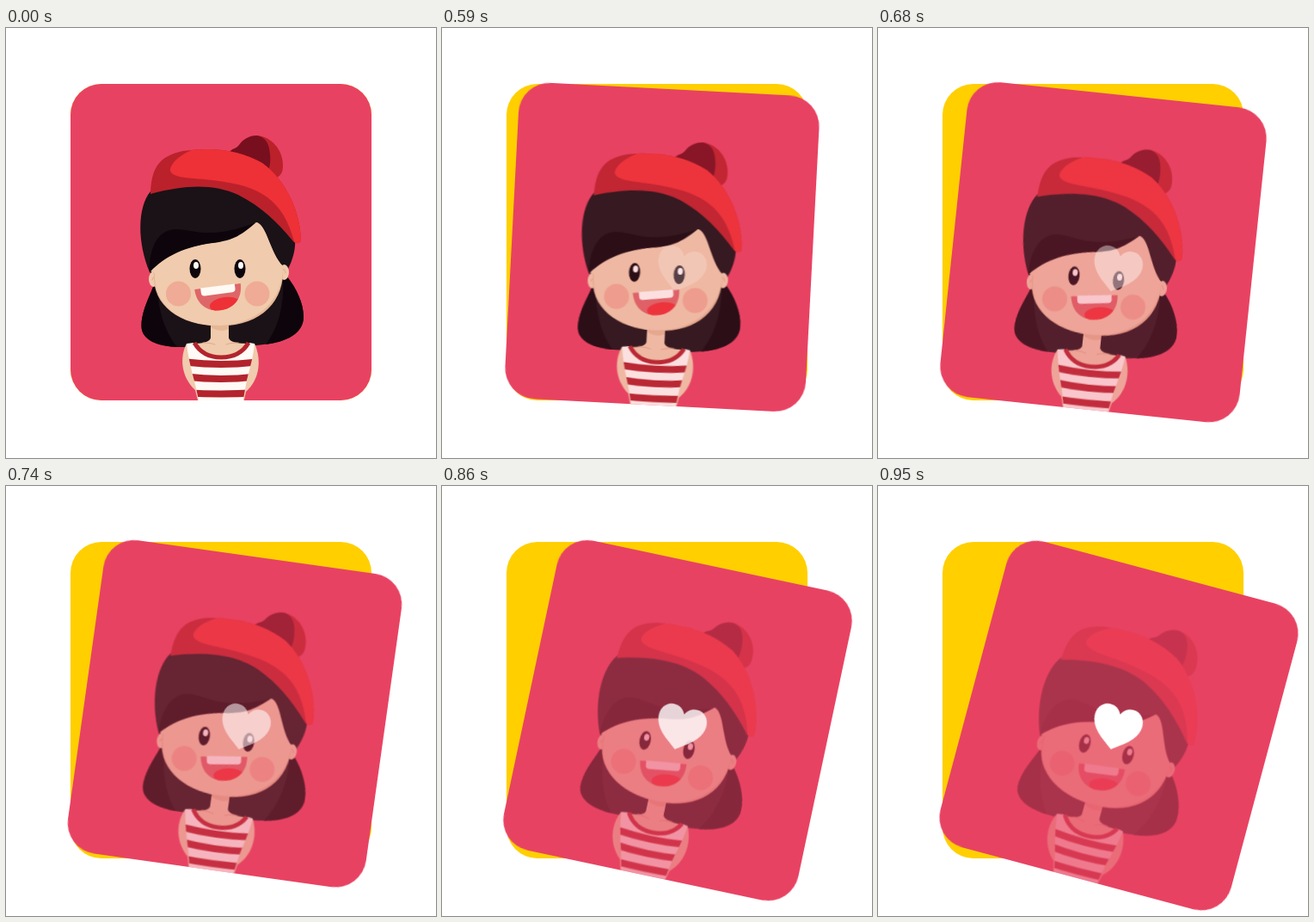
An HTML page for the animation above (1420 ms loop, 500 by 500 pixels).

```html
<!DOCTYPE html>
<html lang="en">
<head>
<meta charset="utf-8">
<title>Tilting card</title>
<style>
  html, body { margin: 0; width: 100%; height: 100%; overflow: hidden; background: #fff; }
  svg { display: block; width: 100vw; height: 100vh; }

  /* 15 hard steps of 30 ms, then a hold */
  .card, .girl, .heart { animation: 1420ms infinite both; }
  .card { transform-box: view-box; transform-origin: 250px 249px; animation-name: tilt; }
  .girl { animation-name: fade; }
  .heart { animation-name: show; }

  @keyframes tilt {
    0% { transform: translate(0px, 0px) rotate(0deg); }
    35.2% { transform: translate(0px, 0px) rotate(0deg); animation-timing-function: steps(15, end); }
    66.89%, 100% { transform: translate(30px, 29.5px) rotate(15deg); }
  }
  @keyframes fade {
    0% { opacity: 1; transform: translate(0px, 0px); }
    35.2% { opacity: 1; transform: translate(0px, 0px); animation-timing-function: steps(15, end); }
    66.89%, 100% { opacity: .3; transform: translate(-2.7px, -.5px); }
  }
  @keyframes show {
    0% { opacity: 0; }
    35.2% { opacity: 0; animation-timing-function: steps(15, end); }
    66.89%, 100% { opacity: 1; }
  }

  .pink { fill: #e84262; }
  .yellow { fill: #ffcf00; }
  .hair { fill: #1a1217; }
  .ink { fill: #0d050b; }
  .skin { fill: #f0cbad; }
  .shade { fill: #e5b795; }
  .line { fill: none; stroke: #dfa98a; stroke-width: 1; stroke-linecap: round; }
  .blush { fill: #efab95; }
  .red { fill: #ee3136; }
  .crimson { fill: #bb212b; }
  .wine { fill: #780f1e; }
  .cloth { fill: #fffaf5; }
  .stripes { fill: none; stroke: #b3242d; stroke-width: 8; }
  .collar { fill: none; stroke: #b3242d; stroke-width: 5; }
</style>
</head>
<body>
<svg viewBox="0 0 500 500">
  <defs>
    <path id="shirt" d="M210 367 L218 366 C225 379 236 384 250 384 C265 384 276 379 283 366 L289 367 C287 388 281 402 279 415 L275 437 H224.500 C221 412 213 395 210 367Z"/>
    <path id="mouth" d="M-27 0 H27 C27 18 15 28 0 28 C-15 28 -27 18 -27 0Z"/>
    <path id="beret" d="M168 193 C169 165 176 149 206 143 C242 138 272 142 298 157 C326 177 343 215 343 248 C340 251 336 251 333 247 C316 226 296 207 270 194 C242 181 208 182 168 193Z"/>
    <clipPath id="inShirt"><use href="#shirt"/></clipPath>
    <clipPath id="inMouth"><use href="#mouth"/></clipPath>
    <clipPath id="inBeret"><use href="#beret"/></clipPath>
    <clipPath id="inCard"><rect x="75" y="65" width="350" height="368" rx="36"/></clipPath>
  </defs>

  <rect class="yellow" x="75" y="65" width="350" height="368" rx="36"/>

  <g class="card">
    <rect class="pink" x="75" y="65" width="350" height="368" rx="36"/>
    <g clip-path="url(#inCard)">
      <g class="girl">
        <!-- back hair -->
        <path class="hair" d="M175 285 C174 303 158 322 157.500 346 C157 364 180 371 205 371 C240 371 265 370 290 369 C322 367 346 357 346 336 C346 320 338 303 326 288Z"/>
        <path class="ink" d="M175 285 C174 303 158 322 157.500 346 C157 364 178 370 199 371 C184 352 175 325 176 290Z"/>
        <path class="ink" d="M326 288 C338 303 346 320 346 336 C346 355 326 365 302 368 C316 350 324 322 322 292Z"/>

        <!-- body -->
        <path class="skin" d="M210 367 C202 382 203 405 220 421 L224 437 H276 L279 423 C296 408 297 384 289 367 C276 367 260 367 259 360 V343 H238 V360 C237 367 222 367 210 367Z"/>
        <path class="shade" d="M238 344 H259 V350 C252 353 244 352 238 348Z"/>
        <path class="line" d="M229 366 Q238 366 243 368 M270 366 Q261 366 256 368"/>
        <use class="cloth" href="#shirt"/>
        <path class="stripes" clip-path="url(#inShirt)" d="M205 388 Q250 394 295 388 M205 405 Q250 411 295 405 M205 424 Q250 427 295 424"/>
        <path class="collar" d="M219 366 C226 378 237 383 250 383 C264 383 275 378 282 366"/>

        <!-- head -->
        <path class="hair" d="M168 190 C153 208 152 248 167 284 L190 300 H310 L328 280 C334 268 337 256 336 245 C320 190 210 160 168 190Z"/>
        <ellipse class="skin" cx="171.500" cy="292" rx="5.500" ry="9"/>
        <ellipse class="skin" cx="323.500" cy="284" rx="5.500" ry="9"/>
        <path class="line" d="M170 293 Q171 288 174 289 M325 285 Q325 280 322 281"/>
        <path class="shade" d="M170 281 C188 262 210 254 240 250 C266 246 274 236 291 226 C303 228 307 262 322 277 C325 317 297 346 250 346.500 C202 347 170 322 172 287Z"/>
        <path class="skin" d="M168 283 C188 262 210 254 240 250 C266 246 274 236 291 226 C303 228 307 262 322 277 C323 315 294 344 249 346 C202 346 171 322 173 285Z"/>
        <path class="ink" d="M167 284 C166 255 177 235 196 234 C216 233 235 248 291 226 C274 240 266 247 240 250 C210 254 186 264 167 284Z"/>

        <circle class="blush" cx="200.500" cy="309" r="14.500"/>
        <circle class="blush" cx="292" cy="309" r="14.500"/>
        <g id="eye">
          <ellipse class="ink" cx="220" cy="280" rx="6.500" ry="11"/>
          <ellipse class="cloth" cx="221" cy="276" rx="3" ry="4"/>
        </g>
        <use href="#eye" x="52"/>

        <g transform="translate(246 300.500) rotate(-7.500)">
          <use href="#mouth" fill="#de6668"/>
          <ellipse class="red" clip-path="url(#inMouth)" cx="6" cy="22" rx="18" ry="8.500"/>
          <path class="cloth" d="M-20 -.500 H20 V5 Q20 9 16 9 H-16 Q-20 9 -20 5Z"/>
        </g>

        <!-- beret -->
        <path class="crimson" d="M275 150 L291 125 C309 126 322 142 322 160 C322 167 320 171 315 174Z"/>
        <path class="wine" d="M259 145 C264 139 267 141 271 136 C276 129 283 125 291 125 C299 126 304 131 306 140 C308 150 308 160 304 168Z"/>
        <use class="crimson" href="#beret"/>
        <path class="red" clip-path="url(#inBeret)" d="M218 141 C203 147 191 157 191 166 C194 176 222 174 248 178 C292 184 323 197 336 252 L350 252 L340 180 L280 130Z"/>
      </g>
    </g>
  </g>

  <g class="heart">
    <path fill="#fff" transform="translate(279.500 279.500) rotate(15) translate(-1.500 0)" d="M0 28 C-10 20 -28.500 10 -28.500 -7 C-28.500 -17 -21 -23 -14 -23 C-8 -23 -3 -20 0 -14 C3 -20 8 -23 14 -23 C21 -23 28.500 -17 28.500 -7 C28.500 10 10 20 0 28Z"/>
  </g>
</svg>
</body>
</html>
```
